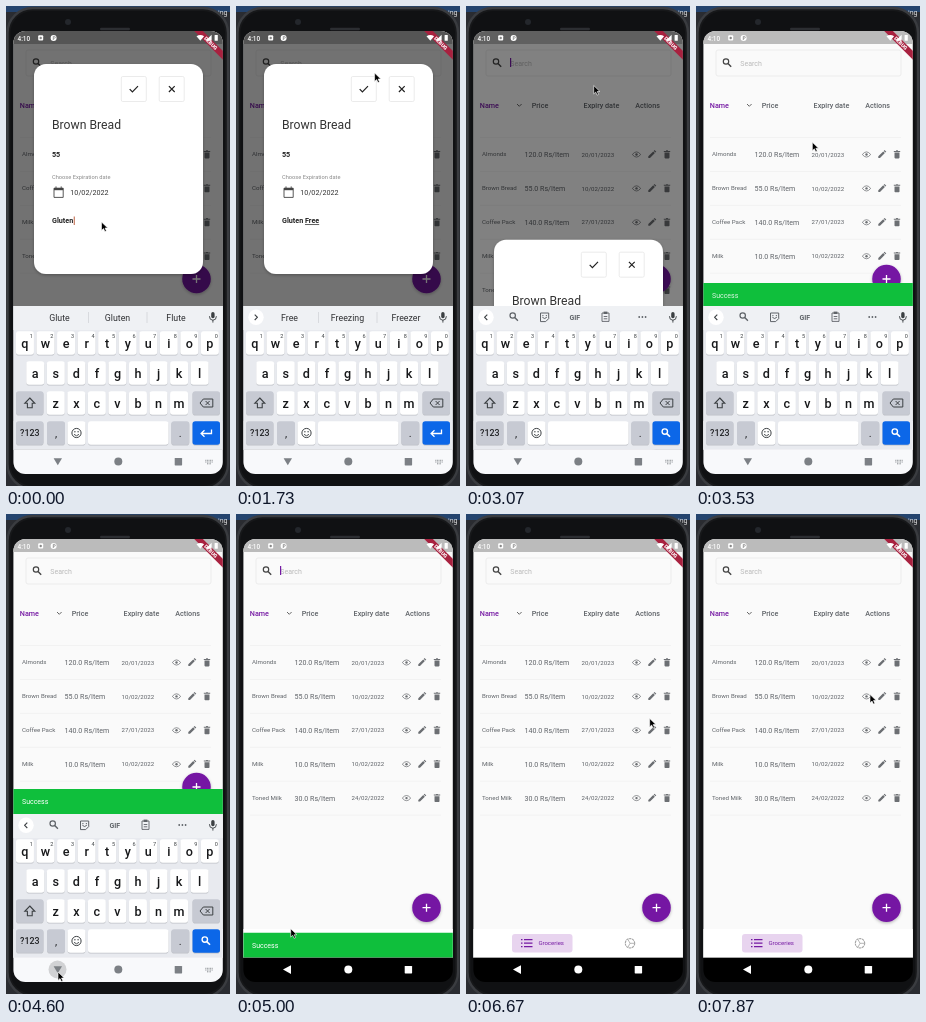
An HTML page for the animation above (8000 ms loop, 224 by 480 pixels).

```html
<!DOCTYPE html>
<html lang="en">
<head>
<meta charset="utf-8">
<title>Grocery list</title>
<style>
  html, body { margin: 0; width: 100%; height: 100%; overflow: hidden; background: #000; }
  svg { display: block; width: 100vw; height: 100vh; }
  text { font-family: Roboto, "Noto Sans", sans-serif; white-space: pre; }
</style>
</head>
<body>
<svg id="stage" viewBox="0 0 224 480">
  <defs>
    <clipPath id="screen"><rect x="7.4" y="25" width="209.4" height="443" rx="12"/></clipPath>
    <clipPath id="app"><rect x="7" y="25" width="210" height="418.7"/></clipPath>
    <clipPath id="snackClip"><rect id="snackRect" x="7" width="210"/></clipPath>
    <filter id="shadow" x="-30%" y="-30%" width="160%" height="160%">
      <feDropShadow dx="0" dy="1.2" stdDeviation="1.4" flood-opacity=".28"/>
    </filter>
  </defs>
</svg>
<script>
const LOOP = 8000;
const PURPLE = '#7519a3', GREY = '#5f6368', INK = '#3c4043';
const LEFT = 7, WIDTH = 210, APP_END = 443.7;
const stage = document.getElementById('stage');

function add(parent, tag, attrs = {}, text) {
  const node = document.createElementNS('http://www.w3.org/2000/svg', tag);
  for (const name in attrs) node.setAttribute(name, attrs[name]);
  if (text !== undefined) node.textContent = text;
  parent.appendChild(node);
  return node;
}
const group = (parent, attrs) => add(parent, 'g', attrs);
const rect = (parent, x, y, width, height, fill, more) =>
  add(parent, 'rect', { x, y, width, height, fill, ...more });
const disc = (parent, cx, cy, r, fill, more) => add(parent, 'circle', { cx, cy, r, fill, ...more });
const label = (parent, x, y, size, fill, text, more) =>
  add(parent, 'text', { x, y, 'font-size': size, fill, ...more }, text);
const line = (parent, d, stroke, width = 1, more) =>
  add(parent, 'path', { d, stroke, 'stroke-width': width, fill: 'none', ...more });
const shape = (parent, d, fill, more) => add(parent, 'path', { d, fill, ...more });
const MID = { 'text-anchor': 'middle' };
const BOLD = { 'font-weight': 700 };
const MEDIUM = { 'font-weight': 500 };

function magnifier(parent, x, y, color, w = 1.2) {
  disc(parent, x - 1, y - 1, 2.7, 'none', { stroke: color, 'stroke-width': w });
  line(parent, `M${x + 1} ${y + 1}l3.2 3.2`, color, w + .2);
}

// Phone body
rect(stage, 0, 0, 224, 480, '#2a2c31');
rect(stage, 0, 0, 224, 6, '#24446e');
label(stage, 212, 9, 7, '#ddd', 'ing');
rect(stage, 1.5, 2, 220.5, 481, '#17181a', { rx: 25, stroke: '#3a3c40', 'stroke-width': 2.4 });
rect(stage, 4.5, 5, 214.5, 475, '#101113', { rx: 22 });
disc(stage, 62, 16, 3, '#24272c');
rect(stage, 94, 21.8, 30, 2.4, '#2c2e32', { rx: 1.2 });
const screen = group(stage, { 'clip-path': 'url(#screen)' });
const app = group(screen, { 'clip-path': 'url(#app)' });

// List page
rect(app, LEFT, 25, WIDTH, 443, '#fafafa');
rect(app, LEFT, 25, WIDTH, 13, '#bbb');
rect(app, 20, 44, 185, 26, '#fafafa', { rx: 2, stroke: '#e9e9e9', 'stroke-width': .8 });
magnifier(app, 31, 56.5, '#444');
label(app, 44.3, 59.7, 7, '#b9b9b9', 'Search');
const searchCaret = rect(app, 44, 52, 1.2, 9, PURPLE);

label(app, 13.8, 101.7, 7.2, PURPLE, 'Name', MEDIUM);
line(app, 'M51 98l2.3 2.3l2.3-2.3', '#555', .9);
label(app, 65.7, 101.7, 7.2, GREY, 'Price', MEDIUM);
label(app, 117.6, 101.7, 7.2, GREY, 'Expiry date', MEDIUM);
label(app, 169.3, 101.7, 7.2, GREY, 'Actions', MEDIUM);
line(app, 'M14 131.5H205', '#f0f0f0', .7);

const ROW = 33.9, NEW_ITEM = 1;
const rows = [
  ['Almonds', '120.0', '20/01/2023'], ['Brown Bread', '55.0', '10/02/2022'],
  ['Coffee Pack', '140.0', '27/01/2023'], ['Milk', '10.0', '10/02/2022'],
  ['Toned Milk', '30.0', '24/02/2022']
].map(([name, price, date]) => {
  const row = group(app), icon = '#6c6f73';
  label(row, 16, 1.9, 6.15, GREY, name);
  label(row, 58.5, 2.5, 7.1, GREY, price + ' Rs/Item');
  label(row, 115.5, 2.1, 6.15, GREY, date);
  line(row, 'M166.3 0q4.2 -5.2 8.4 0q-4.2 5.2 -8.4 0z', icon, .75);
  disc(row, 170.5, 0, 1.2, icon);
  shape(row, 'M182.3 3.5v-1.7l4.9-4.9l1.7 1.7l-4.9 4.9zM187.7 -3.6l.9-.8l1.7 1.7l-.9.8z', icon);
  shape(row, 'M198.5 -1.9h5v5a.8.8 0 0 1-.8.8h-3.4a.8.8 0 0 1-.8-.8zM197.8 -3.6h2l.5-.6h1.4l.5.6h2v1h-6.4z', icon);
  line(row, 'M14 17H205', '#efefef', .7);
  return row;
});

// Bottom tabs
rect(app, LEFT, 415, WIDTH, 29, '#fff');
rect(app, 46, 420, 60.5, 18.5, '#e8d4ef', { rx: 3 });
for (let i = 0; i < 3; i++) {
  const y = 425.7 + 3.5 * i;
  line(app, `M55 ${y}h1.5M58 ${y}h8.5`, PURPLE, 1.2);
}
label(app, 72.4, 431.4, 6, PURPLE, 'Groceries');
disc(app, 164, 429.3, 4.7, 'none', { stroke: '#a5a5a5', 'stroke-width': 1.1, 'stroke-dasharray': '2.4 .55' });
line(app, 'M164 429.3l-2-3.8M164 429.3h4.2M164 429.3l-2 3.8', '#a5a5a5', .8);

const fab = group(app);
disc(fab, 0, 0, 14.3, PURPLE, { filter: 'url(#shadow)' });
line(fab, 'M-4 0h8M0 -4v8', '#fff', 1.3);

const snack = group(app, { 'clip-path': 'url(#snackClip)' });
rect(snack, LEFT, 0, WIDTH, 480, '#0fbf3c');
const snackText = label(snack, 16, 0, 7, '#fff', 'Success');
const snackRect = document.getElementById('snackRect');

const scrim = rect(app, LEFT, 25, WIDTH, 443, '#000');

// Item dialog
const dialog = group(app);
rect(dialog, 28, 58, 169, 210, '#fff', { rx: 12, filter: 'url(#shadow)' });
for (const x of [115.3, 153.2]) rect(dialog, x, 70.5, 25, 25, '#fff', { rx: 1.5, stroke: '#e6e6e6', 'stroke-width': .8 });
const tap = disc(dialog, 127.8, 83, 11, '#000');
line(dialog, 'M123.7 83.2l2.7 2.8l5.6-5.8', '#222', 1.2);
line(dialog, 'M162.9 80.2l5.8 5.8M168.7 80.2l-5.8 5.8', '#222', 1.2);
label(dialog, 46, 123.3, 12.2, '#333', 'Brown Bread');
label(dialog, 46, 151.3, 7.2, '#222', '55', BOLD);
label(dialog, 46, 172.7, 5.7, '#8a8a8a', 'Choose Expiration date');
line(dialog, 'M48 182.2h9.2v9.2h-9.2zM50 180.4v2M55.2 180.4v2', '#444', .9);
rect(dialog, 48, 182, 9.2, 2.2, '#444');
label(dialog, 64.3, 189.2, 7.2, '#333', '10/02/2022');
const note = label(dialog, 46, 217.3, 7.2, '#222', '', BOLD);
const noteStart = add(note, 'tspan');
const noteWord = add(note, 'tspan', { 'text-decoration': 'underline' });
const noteCaret = rect(dialog, 0, 210.5, .9, 8.5, '#b5502f');

// Keyboard
const keyboard = group(app);
rect(keyboard, LEFT, 300, WIDTH, 146, '#e8eaef');
rect(keyboard, LEFT, 300, WIDTH, 24, '#eff1f4');
const KEY_W = 18, KEY_H = 23.5, PITCH = 20.55;
function key(x, y, width = KEY_W, fill = '#fff') {
  rect(keyboard, x, y + .7, width, KEY_H, '#bfc2c7', { rx: 2.8 });
  rect(keyboard, x, y, width, KEY_H, fill, { rx: 2.8 });
}
[['qwertyuiop', 8.7], ['asdfghjkl', 19], ['zxcvbnm', 39.5]].forEach(([letters, left], row) => {
  [...letters].forEach((letter, i) => {
    const x = left + PITCH * i + 1.25, y = 325.3 + 30 * row;
    key(x, y);
    label(keyboard, x + 9, y + 16.3, 12.6, '#17181a', letter, { ...MID, ...MEDIUM });
    if (!row) label(keyboard, x + 15.4, y + 6.3, 5.5, '#3c4043', (i + 1) % 10, MID);
  });
});
const SPECIAL = '#c7cad3', LOW = 415.3;
key(10, 385.3, 27.5, SPECIAL);
line(keyboard, 'M23.8 392l5 5.3h-2.6v4.5h-4.8v-4.5h-2.6z', INK, 1.1);
key(186.5, 385.3, 27.5, SPECIAL);
line(keyboard, 'M194 397l3.3-4h9.5v8h-9.5zM199.6 395l4 4M203.6 395l-4 4', INK, 1);
key(10, LOW, 27.5, SPECIAL);
label(keyboard, 23.8, 430.3, 8.9, '#202124', '?123', { ...MID, ...MEDIUM });
key(41, LOW, KEY_W, SPECIAL);
label(keyboard, 50, 431, 11, '#202124', ',', MID);
key(61.5, LOW);
disc(keyboard, 70.5, 427, 4.6, 'none', { stroke: INK, 'stroke-width': 1 });
disc(keyboard, 68.9, 425.8, .7, INK);
disc(keyboard, 72.1, 425.8, .7, INK);
line(keyboard, 'M68 428.3q2.5 3 5 0', INK, .9);
key(82, LOW, 80.5);
key(165.3, LOW, KEY_W, SPECIAL);
label(keyboard, 174.3, 430.5, 11, '#202124', '.', MID);
key(186.5, LOW, 27.5, '#0c67e8');
const enterIcon = group(keyboard);
line(enterIcon, 'M205.5 423.5v4h-10M198.5 424.2l-3.4 3.3l3.4 3.3', '#fff', 1.3);
const searchIcon = group(keyboard);
magnifier(searchIcon, 199.8, 426.6, '#fff', 1.4);

// Strip above the keys
rect(keyboard, 205.2, 306, 3.4, 6.2, INK, { rx: 1.7 });
line(keyboard, 'M203.4 310.2q0 4 3.5 4t3.5-4M206.9 314v2.6', INK, .9);
const chip = group(keyboard);
disc(chip, 20, 311.3, 7.7, '#fff');
const chipArrow = line(chip, '', INK, 1.1);
const words = group(keyboard);
line(words, 'M82.5 306v11M141 306v11', '#d2d5d9', .8);
const wordLabels = [53.5, 111.5, 170].map(x => label(words, x, 314.6, 8.8, '#303134', '', MID));
const tools = group(keyboard);
magnifier(tools, 47.7, 310.5, GREY);
line(tools, 'M74.5 307h8.2v5.6l-3 3h-5.2zM76.4 311.3q2.2 2.4 4.4 0', GREY, 1);
disc(tools, 76.9, 309.6, .7, GREY);
disc(tools, 80.4, 309.6, .7, GREY);
label(tools, 108.8, 313.6, 7, GREY, 'GIF', { ...MID, ...BOLD });
line(tools, 'M136 307h7v8.4h-7zM137.7 310.5h3.6M137.7 312.8h3.6', GREY, .9);
rect(tools, 137.6, 305.6, 3.8, 2.4, GREY);
for (const x of [173.2, 176.4, 179.6]) disc(tools, x, 311, .9, GREY);

// System navigation
const navLight = group(screen), navDark = group(screen);
function navBar(parent, bg, fg, back) {
  rect(parent, LEFT, APP_END, WIDTH, 25, bg);
  const ripple = disc(parent, 51.5, 455.5, 9, '#777', { opacity: 0 });
  shape(parent, back, fg);
  disc(parent, 112.3, 455.6, 4, fg);
  rect(parent, 168.7, 452, 7.4, 7.4, fg, { rx: .6 });
  return ripple;
}
const backRipple = navBar(navLight, '#f8f9fb', '#7c8085', 'M47.6 452.2h8.4l-4.2 7z');
line(navLight, 'M199.3 454.3h7.4M199.3 456h7.4M201 457.8h4', '#7c8085', .9, { 'stroke-dasharray': '1 .6' });
navBar(navDark, '#000', '#fff', 'M55 451.2v8.8l-8-4.4z');

// Debug ribbon
const ribbon = group(screen, { transform: 'translate(217 25) rotate(45) scale(.508)' });
rect(ribbon, -40, 28, 80, 12, '#a8213f');
label(ribbon, 0, 37.6, 10.2, '#fff', 'DEBUG', { ...MID, 'font-weight': 900 });

// Status icons stay above the scrim
label(screen, 11.5, 34.6, 6.4, '#fff', '4:10', MEDIUM);
rect(screen, 32.2, 29.2, 5, 5.4, '#fff', { rx: 1 });
disc(screen, 34.7, 32, 1.2, '#888');
disc(screen, 47.6, 32, 3, '#fff');
line(screen, 'M47.3 34v-3.6h1.1a.8.8 0 0 1 0 1.8h-1', '#888', .8);
shape(screen, 'M190.5 30.2q3.8-2.6 7.6 0l-3.8 4.6z', '#fff');
shape(screen, 'M205.6 28.8v6h-6z', '#fff');
rect(screen, 208.6, 29, 3.2, 5.8, '#fff', { rx: .5 });

const mouse = group(stage);
shape(mouse, 'M0 0v8.4l2-1.8l1.4 3l1.5-.7l-1.4-2.9h2.7z', '#000', { stroke: '#fff', 'stroke-width': .6 });

// Motion: time, x, y
const mousePath = [
  [0, 95.5, 216], [1270, 95.5, 216], [1730, 138.6, 67], [1930, 127.7, 79.5], [3250, 127.7, 79.5],
  [4400, 52, 458], [4700, 52, 458], [5000, 54.7, 414.7], [5600, 53.4, 336], [6200, 53.4, 336],
  [6600, 188, 212], [6800, 173, 186], [7000, 173, 186], [7400, 174, 180.5], [LOOP, 174, 180.5]
];
const typing = [[0, ''], [270, ' '], [600, ' F'], [730, ' Fr'], [930, ' Fre'], [1070, ' Free']];

const ramp = (t, from, to) => Math.min(1, Math.max(0, (t - from) / (to - from)));
const smooth = u => u * u * (3 - 2 * u);
const show = (node, on) => node.setAttribute('visibility', on ? 'visible' : 'hidden');
const move = (node, x, y) => node.setAttribute('transform', `translate(${x} ${y})`);

function mouseAt(t) {
  const i = mousePath.findIndex(p => p[0] > t);
  const [t0, x0, y0] = mousePath[i - 1], [t1, x1, y1] = mousePath[i];
  const u = smooth(ramp(t, t0, t1));
  return [x0 + (x1 - x0) * u, y0 + (y1 - y0) * u];
}

function render(t) {
  const typed = typing.filter(step => step[0] <= t).pop()[1];
  noteStart.textContent = 'Gluten' + typed.slice(0, 1);
  noteWord.textContent = typed.slice(1);
  noteCaret.setAttribute('x', 46.6 + note.getComputedTextLength());
  show(noteCaret, t < 500 || (t >= 600 && t < 1600) || (t >= 2100 && t < 2600));

  const closing = ramp(t, 2848, 3248);
  move(dialog, 0, 422 * closing ** 1.5);
  show(dialog, closing < 1);
  scrim.setAttribute('opacity', .54 * (1 - closing ** 4));
  tap.setAttribute('opacity', t > 2100 ? .12 * (1 - ramp(t, 2150, 2600)) : 0);

  const saved = t >= 2870, suggested = t >= 1100;
  rows.forEach((row, i) => {
    const place = saved || i < NEW_ITEM ? i : i - 1;
    move(row, 0, 148.5 + ROW * place);
    show(row, saved || i !== NEW_ITEM);
  });
  show(searchCaret, saved && t % 1000 < 500);
  show(words, !saved);
  show(tools, saved);
  show(enterIcon, !saved);
  show(searchIcon, saved);
  show(chip, suggested);
  chipArrow.setAttribute('d', saved ? 'M21.3 308.6l-2.7 2.7l2.7 2.7' : 'M18.7 308.6l2.7 2.7l-2.7 2.7');
  (suggested ? ['Free', 'Freezing', 'Freezer'] : ['Glute', 'Gluten', 'Flute'])
    .forEach((word, i) => { wordLabels[i].textContent = word; });

  const hidden = smooth(ramp(t, 4700, 4950));
  move(keyboard, 0, 144 * hidden);
  show(navLight, t < 4900);
  show(navDark, t >= 4900);
  backRipple.setAttribute('opacity', t > 4500 ? .3 * (1 - ramp(t, 4620, 4850)) : 0);
  move(fab, 190.5, 273 + 120.7 * hidden);

  const bar = (1 - (1 - ramp(t, 3350, 3600)) ** 2) * (1 - ramp(t, 5530, 5730)) ** 2;
  const bottom = 300 + (APP_END - 300) * hidden, height = 25 * bar;
  snackRect.setAttribute('y', bottom - height);
  snackRect.setAttribute('height', height);
  snackText.setAttribute('y', bottom - height + 15);
  snackText.setAttribute('opacity', ramp(bar, .5, 1));

  move(mouse, ...mouseAt(t));
}

function tick() {
  render(performance.now() % LOOP);
  requestAnimationFrame(tick);
}
tick();
</script>
</body>
</html>
```
